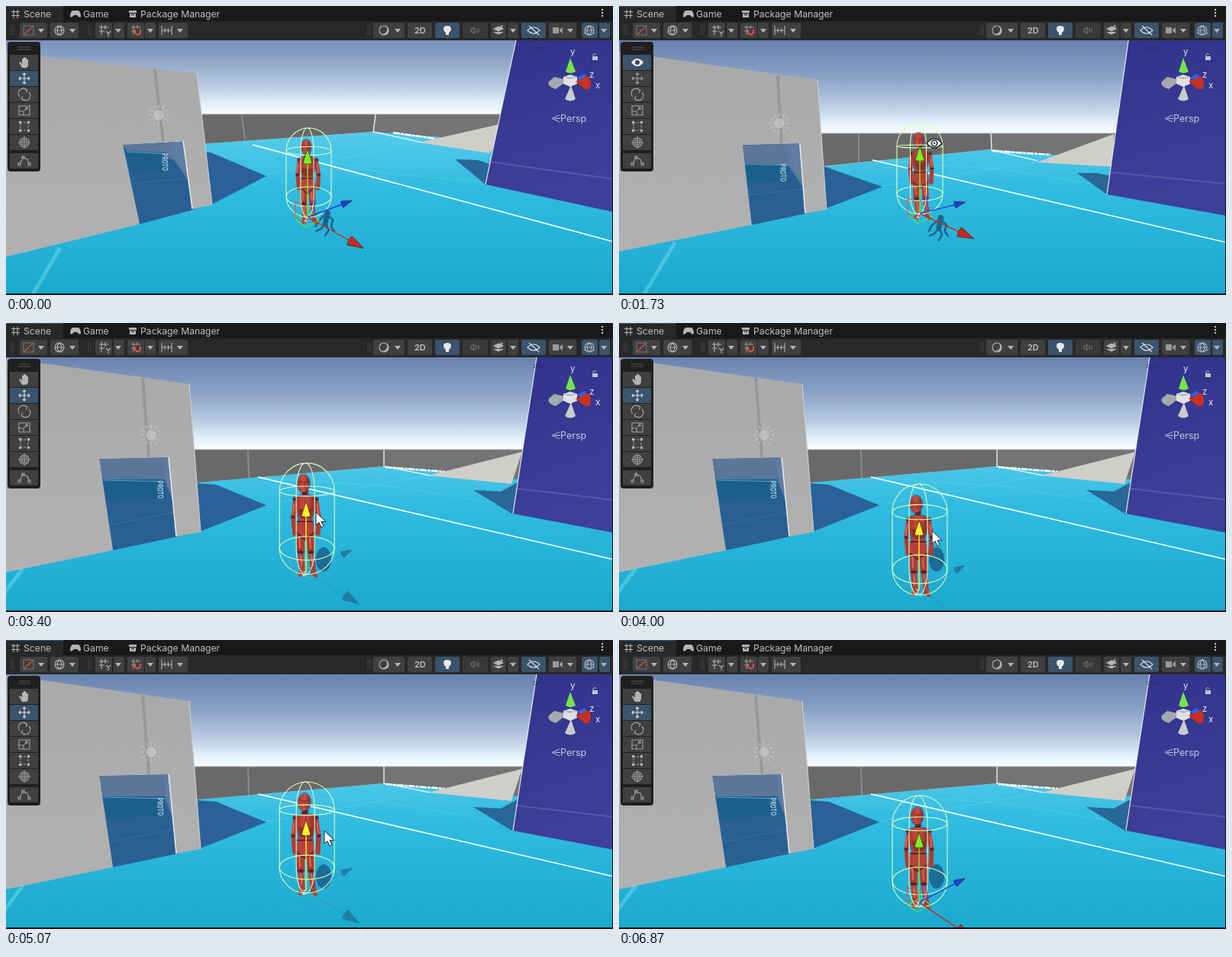
Animation, 795 px wide and 379 px high, one loop 6940 ms. Source, as an HTML page:

```html
<!DOCTYPE html>
<html lang="en">
<head>
<meta charset="utf-8">
<title>Scene view</title>
<style>
html, body { margin: 0; width: 100%; height: 100%; overflow: hidden; background: #191919; }
svg { display: block; width: 795px; height: 379px; }
text { font-family: Inter, Roboto, sans-serif; font-size: 12.2px; fill: #c0c0c0; }
.ico { fill: none; stroke: #b4b4b4; stroke-width: 1.1; }
#tools .ico { stroke: #a2a2a2; }
.wire { fill: none; stroke: #d9ffb8; stroke-width: 1.1; }
</style>
</head>
<body>
<svg id="stage" viewBox="0 0 795 379">
  <defs>
    <linearGradient id="sky" gradientUnits="userSpaceOnUse" x1="0" y1="45" x2="0" y2="168">
      <stop offset="0" stop-color="#6782ae"/><stop offset=".4" stop-color="#8ca3c7"/>
      <stop offset=".7" stop-color="#bccde3"/><stop offset=".88" stop-color="#e4f1fa"/><stop offset="1" stop-color="#fcfeff"/>
    </linearGradient>
    <linearGradient id="floor" gradientUnits="userSpaceOnUse" x1="0" y1="165" x2="0" y2="378">
      <stop offset="0" stop-color="#55cceb"/><stop offset=".35" stop-color="#30bbe0"/><stop offset="1" stop-color="#1aa9cf"/>
    </linearGradient>
    <linearGradient id="purple" x1="0" y1="0" x2=".2" y2="1">
      <stop offset="0" stop-color="#31338c"/><stop offset="1" stop-color="#3d3f98"/>
    </linearGradient>
    <linearGradient id="wall" x1="0" y1="0" x2="0" y2="1">
      <stop offset="0" stop-color="#a9a9aa"/><stop offset="1" stop-color="#b1b1b1"/>
    </linearGradient>
    <linearGradient id="skin">
      <stop offset="0" stop-color="#a8342f"/><stop offset=".5" stop-color="#cc4f3f"/><stop offset="1" stop-color="#8a2a2c"/>
    </linearGradient>
    <clipPath id="view"><rect y="45" width="794" height="332"/></clipPath>
  </defs>

  <rect width="795" height="379" fill="#191919"/>
  <g clip-path="url(#view)">
    <rect id="air" y="45" width="795" height="210" fill="url(#sky)"/>
    <g id="world"></g>
    <text id="sign" style="font:bold 8px Inter,sans-serif;fill:#a9cbe0">PROTO</text>
    <g id="sun" stroke="#cfcfc8" stroke-width="1.2" fill="#cbcbc4" opacity=".65"></g>

    <g id="shade" fill="none" stroke="#1c557f" stroke-width="4" stroke-linecap="round" stroke-linejoin="round">
      <circle cx="2" cy="-14" r="3" fill="#1c557f"/>
      <path stroke-width="8" d="M1-9L-1 2"/>
      <path stroke-width="3" d="M-4-10L-12-2L-16 6M5-9L11-4L8 6L13 13M-2 3L-8 10L-15 13M1 3L4 12L-1 20"/>
    </g>
    <ellipse id="blob" cx="416" cy="310" rx="10" ry="16" fill="#1c5f8c"/>

    <g id="man">
      <g fill="none" stroke="#3f5f88" stroke-width="3" opacity=".75"><use href="#body"/></g>
      <g id="body">
        <g fill="none" stroke="#b03b34" stroke-linecap="round" stroke-linejoin="round">
          <path stroke-width="6" d="M-12 34L-15 57L-13 79M15 34L19 57L18 79"/>
          <path stroke-width="10" d="M-6 80L-5 102M8 80L9 102"/>
          <path stroke-width="7" d="M-5 106L-3 130M9 106L12 131"/>
          <path stroke-width="5" d="M-3 131L-6 134M12 132L15 135"/>
          <path stroke="#db6a55" stroke-width="2" d="M-7 82L-6 98M7 83L8 98M-5 108L-4 122M9 108L11 122M-14 40L-16 54M17 40L19 54"/>
        </g>
        <path d="M-3 20H4V32H-3Z" fill="#542630"/>
        <g id="chest">
          <path d="M-11 30Q1 25 13 30L14 44L9 62H-7L-11 44Z" fill="url(#skin)"/>
          <path d="M-8 45Q1 50 11 45L9 57L1 61L-6 57Z" fill="#8c2d2d"/>
          <path d="M1 30V46" stroke="#7d2929"/>
        </g>
        <path d="M-9 63Q1 60 11 63L14 79L4 87H-1L-12 78Z" fill="#b8413a"/>
        <path d="M-10 63H11M-11 78L0 87L13 78" stroke="#482433" stroke-width="1.7" fill="none"/>
        <g fill="#482433">
          <circle cx="-13" cy="33" r="2"/><circle cx="16" cy="33" r="2"/>
          <circle cx="-15" cy="57" r="2.2"/><circle cx="19" cy="57" r="2.2"/>
          <ellipse cx="-5" cy="104" rx="4" ry="2"/><ellipse cx="9" cy="104" rx="4" ry="2"/>
        </g>
        <g id="head">
          <ellipse cx="-1" cy="12" rx="8" ry="11.5" fill="url(#skin)"/>
          <path d="M-7 9Q0 13 6 8M0 11V19" fill="none" stroke="#7a2529"/>
        </g>
      </g>
    </g>

    <g id="cage" class="wire"></g>
    <g id="handles"></g>
    <g id="arrow"><path d="M0 0V17L4 13.5L7 20L10 18.5L7 12.5H13Z" fill="#fff" stroke="#222"/></g>
    <g id="eye"><path d="M-10 0Q0-12 10 0Q0 12-10 0Z" fill="#fff" stroke="#222" stroke-width="1.5"/><circle r="3.7" fill="none" stroke="#222" stroke-width="1.6"/><circle r="1.2" fill="#222"/></g>
    <g id="compass"></g>
  </g>
  <g id="bars"></g>
  <g id="tools"></g>
</svg>

<script>
const LOOP = 6940, STEP = LOOP / 104;
const $ = id => document.getElementById(id);
const NS = 'http://www.w3.org/2000/svg';

function add(parent, tag, attrs, text) {
  const el = document.createElementNS(NS, tag);
  for (const k in attrs) el.setAttribute(k, attrs[k]);
  if (text) el.textContent = text;
  parent.appendChild(el);
  return el;
}
const set = (el, attrs) => { for (const k in attrs) el.setAttribute(k, attrs[k]); };
const lerp = (a, b, u) => a + (b - a) * u;
const NUM = /-?\d+(\.\d+)?/g;

// Value list at time t from rows of [time, ...values].
function track(t, rows, smooth) {
  let i = 0;
  while (i < rows.length - 2 && t >= rows[i + 1][0]) i++;
  const [a, b] = [rows[i], rows[i + 1]];
  let u = Math.min(1, Math.max(0, (t - a[0]) / (b[0] - a[0])));
  if (smooth) u = u * u * (3 - 2 * u);
  return a.slice(1).map((v, k) => lerp(v, b[k + 1], u));
}

// Blend three camera views; c runs from 0 to 2.
function blend(views, c) {
  const i = Math.min(1, Math.floor(c)), u = c - i;
  if (typeof views[0] === 'number') return lerp(views[i], views[i + 1], u);
  const to = views[i + 1].match(NUM);
  let k = 0;
  return views[i].replace(NUM, n => lerp(+n, +to[k++], u).toFixed(2));
}

// Scenery: attributes, then the same path seen from each camera.
const fill = (f, o = 1) => ({ fill: f, 'fill-opacity': o });
const line = (s, w, o = 1) => ({ fill: 'none', stroke: s, 'stroke-width': w, 'stroke-opacity': o });
const scenery = [
  [fill('url(#floor)'), 'M0 179L250 181L485 165L795 190L795 379L0 379Z', 'M0 209L262 211L487 188L795 210L795 379L0 379Z', 'M0 207L250 209L495 188L795 208L795 379L0 379Z'],
  [fill('#696969'), 'M240 142L484 142L482 165L240 182Z', 'M250 167L487 167L487 188L250 212Z', 'M230 166L495 166L495 188L230 211Z'],
  [fill('#747474'), 'M484 142L680 142L680 181L482 165Z', 'M487 167L680 167L680 205L487 188Z', 'M495 166L700 166L700 208L495 188Z'],
  [line('#8b8b8b', 2), 'M309 144L313 177', 'M314 168L314 204', 'M317 166L318 203'],
  [line('#a5a5a5', 1), 'M249 142L484 142L670 142', 'M260 167L487 167L665 167', 'M240 166L495 166L676 166'],
  [line('#e8f8fc', 1.3), 'M484 142L481 165L545 179', 'M487 167L488 189L548 203', 'M495 166L495 188L556 200'],
  [{ ...line('#f4ffff', 2.5), 'stroke-dasharray': '9 1 4 1' }, 'M507 166L562 174', 'M489 190L565 195', 'M497 189L575 195'],
  [fill('#d0cec8'), 'M541 179L664 151L633 193Z', 'M547 205L648 168L647 211Z', 'M553 200L676 169L662 211Z'],
  [line('#7ddcf0', 1, .3), 'M323 182L500 220L795 245', 'M332 202L510 215L795 262', 'M330 202L510 215L795 262'],
  [line('#7ddcf0', 1, .3), 'M341 221L541 179', 'M345 236L547 205', 'M341 238L553 200'],
  [line('#f6ffff', 1.6), 'M323 182L795 309', 'M332 202L795 310', 'M330 202L795 310'],
  [fill('#286797'), 'M588 201L618 202L635 208L629 235Z', 'M600 219L625 219L645 223L640 248Z', 'M612 219L648 221L670 209L664 251Z'],
  [fill('url(#purple)'), 'M668 45L628 234L795 270L795 45Z', 'M667 45L639 247L795 275L795 45Z', 'M695 45L664 250L795 275L795 45Z'],
  [line('#686bb0', 2, .6), 'M632 204L795 227', 'M644 218L795 233', 'M668 217L795 232'],
  [line('#e5e7f2', 1.2), 'M668 45L628 234', 'M667 45L639 247', 'M695 45L664 250'],
  [fill('#2a6297'), 'M245 191L268 192L341 223L268 261Z', 'M250 211L270 211L345 237L270 266Z', 'M235 209L275 212L341 239L250 275Z'],
  [fill('#2a5f93'), 'M153 182L240 177L246 267L175 286Z', 'M162 182L240 180L246 272L174 287Z', 'M122 178L215 176L225 280L140 298Z'],
  [fill('#5b7698'), 'M153 182L240 177L244 206L159 190Z', 'M162 182L240 180L242 210L164 206Z', 'M122 178L215 176L217 205L127 205Z'],
  [fill('#1d5f8b'), 'M157 190L210 192L214 217L164 220Z', 'M165 206L221 208L222 230L168 232Z', 'M128 205L208 207L209 230L133 235Z'],
  [line('#5d9fc2', 1.2), 'M157 191L214 194', 'M165 207L222 209', 'M128 206L208 208'],
  [fill('#5f7ca2'), 'M211 179L240 177L244 236L217 197Z', 'M221 181L240 180L246 244L223 210Z', 'M206 176L215 176L221 240L209 208Z'],
  [line('#4c7da8', 1, .6), 'M214 194L245 236M165 233L245 225', 'M222 209L245 244M168 248L245 240', 'M208 208L222 240M136 265L220 248'],
  [fill('url(#wall)'), 'M0 61L250 88L270 261L244 266L232 177L153 182L175 286L0 329Z', 'M0 60L260 97L272 267L244 272L237 180L162 182L174 287L0 322Z', 'M0 46L240 80L255 274L223 280L213 176L122 178L140 298L0 327Z'],
  [line('#909092', 4, .7), 'M195 83L206 178', 'M208 91L213 181', 'M179 72L187 176'],
  [line('#ececec', 1.5), 'M232 177L244 266', 'M237 180L244 272', 'M213 176L223 280'],
  [line('#cfd2d6', 1), 'M250 88L270 261', 'M260 97L272 267', 'M240 80L255 274'],
  [line('#8feaf0', 5, .35), 'M35 378L71 317', 'M33 378L74 310', 'M-20 378L22 322'],
].map(([attrs, ...views]) => ({ el: add($('world'), 'path', attrs), views }));

// Sun icon
add($('sun'), 'circle', { r: 6 });
for (let i = 0; i < 12; i++)
  add($('sun'), 'path', { d: 'M0-9V-14', transform: `rotate(${i * 30})` });

// Collider and move handles
const cage = add($('cage'), 'path', {}), rings = add($('cage'), 'path', {});
const H = $('handles');
const planes = add(H, 'g', { fill: 'none', 'stroke-width': 1.1 });
add(planes, 'path', { d: 'M-15 3L-3 13L15 4L4-6Z', stroke: '#58f043' });
add(planes, 'path', { d: 'M-16-20L-2-14V8L-16 0Z', stroke: '#f24a3c' });
add(planes, 'path', { d: 'M0 0L9-4V-22L0-16Z', stroke: '#4b5cff' });
const axes = ['#c92a20', '#2440e0', '#7cf01e'].map(color => ({
  color,
  rod: add(H, 'path', { 'stroke-width': 1.4 }),
  tip: add(H, 'path', { 'stroke-width': .6 }),
}));
const core = add(H, 'path', { d: 'M-2-2H2L-2 3H2', fill: 'none', stroke: '#fff', 'stroke-width': 1 });

function drawAxis(axis, x0, y0, x, y, size, color, ghost) {
  const a = Math.atan2(y - y0, x - x0) * 180 / Math.PI;
  set(axis.rod, { d: `M${x0} ${y0}L${x} ${y}`, stroke: color, opacity: ghost ? .16 : 1 });
  set(axis.tip, {
    d: `M${size} 0L${-size * .75} ${-size * .55}Q${-size} 0 ${-size * .75} ${size * .55}Z`,
    transform: `translate(${x} ${y}) rotate(${a})`,
    fill: ghost ? '#1d6f96' : color, stroke: ghost ? '#2a5878' : '#222', opacity: ghost ? .75 : 1,
  });
}

// View compass
const C = $('compass');
[['M718 93L736 97L720 109Q708 105 711 99Z', '#a5a8ad'], ['M746 95L757 89Q763 93 758 98Z', '#2c63e6'],
 ['M733 86Q739 90 746 86L739 68Z', '#79e34b'], ['M732 122Q739 127 746 122L740 104Z', '#c9cbce'],
 ['M730 93L739 90L748 93V102L739 106L730 102Z', '#dfe1e4'], ['M730 93L739 96L748 93M739 96V106', '#b5b7ba'],
 ['M746 99L762 92Q769 98 764 109L758 109Z', '#c9301f']
].forEach(([d, f]) => add(C, 'path', { d, fill: f }));
[['y', 739, 64], ['z', 764, 94], ['x', 772, 108]].forEach(([s, x, y]) =>
  add(C, 'text', { x, y, style: 'font-size:11.5px;fill:#e6e6ee' }, s));
add(C, 'rect', { x: 768, y: 66, width: 7, height: 5, fill: '#c4c4d4' });
add(C, 'path', { d: 'M769 66V64Q771 61 773 64', class: 'ico' });
add(C, 'path', { d: 'M725 143L715 147.500L725 152M718 147.500H726', class: 'ico', style: 'stroke:#c0c0dc;stroke-width:1' });
add(C, 'text', { x: 726, y: 152, style: 'font-size:12.5px;fill:#c6c6de' }, 'Persp');
add(C, 'path', { d: 'M690 55H706M690 58H706', stroke: '#23263f', opacity: .5 });

// Tabs and top toolbar
const B = $('bars');
const BUTTON = '#404040', ACTIVE = '#3b536c', OFF = '#383838';
const box = (x, w, color = BUTTON) => add(B, 'rect', { x, y: 22, width: w, height: 20, rx: 2, fill: color });
const icon = (d, extra = {}) => add(B, 'path', { d, class: 'ico', ...extra });
const solid = { style: 'fill:#b4b4b4;stroke:none' };
const caret = x => icon(`M${x - 4} 30H${x + 4}L${x} 35Z`, solid);
const globe = (x, y) => icon(`M${x - 6} ${y}a6 6 0 1 0 12 0a6 6 0 1 0-12 0M${x - 6} ${y}H${x + 6}M${x} ${y - 6}q-6 6 0 12q6-6 0-12`);
add(B, 'rect', { width: 795, height: 45, fill: '#282828' });
add(B, 'rect', { width: 795, height: 20, fill: '#191919' });
add(B, 'rect', { width: 75, height: 20, fill: '#282828' });
add(B, 'rect', { width: 75, height: 1, fill: '#2f5878' });
icon('M7 7.500H18M7 12.500H18M10 5V16M15 5V16');
icon('M87 6H95Q98 8 98 14Q96 16 93 12H89Q86 16 84 14Q84 8 87 6Z', solid);
icon('M161 6H171V9H161ZM162 10H170V15H162Z', solid);
icon('M164 11.500H168', { style: 'stroke:#222' });
[['Scene', 23], ['Game', 101], ['Package Manager', 176]].forEach(([s, x]) => add(B, 'text', { x, y: 15 }, s));
[5, 9, 13].forEach(cy => add(B, 'circle', { cx: 781, cy, r: 1.2, fill: '#c8c8c8' }));
[7, 108, 474].forEach(x => icon(`M${x} 25V39M${x + 3} 25V39`, { style: 'stroke:#444' }));
[[18, 36], [58, 37], [117, 22], [141, 14], [159, 22], [182, 14], [200, 38], [481, 41], [526, 32], [562, 32, ACTIVE],
 [598, 33, OFF], [635, 20], [657, 14], [675, 32, ACTIVE], [711, 36], [754, 21, ACTIVE], [777, 14, ACTIVE]].forEach(b => box(...b));
[46, 87, 147, 189, 228, 513, 664, 739, 783].forEach(caret);
icon('M23 26H36V38H23Z', { style: 'stroke:#777' });
icon('M24 37L35 27', { style: 'stroke:#e25345' });
globe(70, 32);
icon('M122 28H134M122 33H129M125 25V38M130 25V31M131 33L134 36L137 33M134 36V40');
icon('M164 28H176M164 33H168M167 25V38M172 25V29', { style: 'stroke:#999' });
icon('M169 31V35Q172.500 40 176 35V31', { style: 'stroke:#e25345;stroke-width:2' });
icon('M204 26V38M217 26V38M204 32H217M208 29V35M212.500 29V35');
icon('M489 32a6 6 0 1 0 12 0a6 6 0 1 0-12 0');
icon('M498 27Q502 35 492 37Q503 39 501 30Z', solid);
add(B, 'text', { x: 535, y: 36, style: 'font-size:11px;font-weight:600' }, '2D');
icon('M578 26Q583 26 583 30Q583 33 580 35V38H576V35Q573 33 573 30Q573 26 578 26Z', { style: 'fill:#e8e8e8;stroke:none' });
icon('M609 30H611L613 28V36L611 34H609ZM616 29V35M619 29V35', { style: 'stroke:#757575' });
icon('M639 30L645 27L651 30L645 33ZM639 34L645 37L651 34M649 25V29M647 27H651', { style: 'fill:#b4b4b4' });
icon('M683 32Q691 24 699 32Q691 40 683 32ZM685 26L698 38', { style: 'stroke:#e0e0e0' });
icon('M716 28H724V36H716ZM725 31L729 28V36L725 33Z', { style: 'fill:#999;stroke:none' });
globe(764, 32);
icon('M764 25V27M757 36L759 35M771 36L769 35');
icon('M0 377.500H795M794.500 45V379', { style: 'stroke:#151515' });

// Side tools
const T = $('tools');
add(T, 'rect', { x: 2, y: 47, width: 43, height: 170, rx: 4, fill: '#1f1f1f' });
add(T, 'path', { d: 'M16 54H32M16 57H32', stroke: '#555' });
const slots = [74, 95, 116, 137, 158, 179, 203].map(y =>
  add(T, 'rect', { x: 5, y: y - 10, width: 37, height: 20, rx: 1, fill: BUTTON }));
const glyph = (y, d, extra = {}) => add(T, 'path', { d, class: 'ico', transform: `translate(24 ${y})`, ...extra });
const hand = glyph(74, 'M-3 7L-7 0L-5-1L-3 2V-5H-1V-1V-7H1V-1V-6H3V0V-4H5V4L3 7Z', solid);
const look = glyph(74, 'M-8 0Q0-10 8 0Q0 10-8 0Z', { style: 'fill:#eee;stroke:none' });
const pupil = glyph(74, 'M-3 0a3 3 0 1 0 6 0a3 3 0 1 0-6 0', { style: 'fill:#34495f;stroke:none' });
const move = glyph(95, 'M-7 0H7M0-7V7M-5-2L-7 0L-5 2M5-2L7 0L5 2M-2-5L0-7L2-5M-2 5L0 7L2 5');
glyph(116, 'M-6 3A6 6 0 0 1 3-6M6-3A6 6 0 0 1-3 6M0-7L4-6L2-2M0 7L-4 6L-2 2');
glyph(137, 'M-7-6H7V6H-7ZM-7 1H-1V6M0 0L4-4M1-4H4V-1');
glyph(158, 'M-5-5H5V5H-5Z', { style: 'stroke-dasharray:3 1.5' });
glyph(158, 'M-7-7h3v3h-3zM4-7h3v3h-3zM-7 4h3v3h-3zM4 4h3v3h-3z', solid);
glyph(179, 'M-6 0a6 6 0 1 0 12 0a6 6 0 1 0-12 0M-8 0H8M0-8V8M-3-3H3V3H-3Z');
glyph(203, 'M-6 4L-2-4L4-2L6 4M-8 3h3v3h-3zM-3-6h3v3h-3zM5 3h3v3h-3z');

const CAMERA = [[0, 0], [1530, 0], [1730, 1], [2470, 2], [LOOP, 2]];
const DROP = [[0, 0], [3130, 0], [3600, 67], [4000, 69], [4370, 41], [4720, 67], [5070, 44], [5160, 41], [5500, 66], [5800, 62], [LOOP, 62]];
const POINTER = [[400, 607, 280], [730, 614, 262], [1000, 641, 235], [1470, 408, 182]];
const GAZE = [[1500, 413, 180], [1730, 413, 180], [2250, 505, 184], [2600, 515, 184], [2900, 515, 184]];

function draw(t) {
  const c = track(t, CAMERA)[0], d = track(t, DROP, true)[0];
  const view = (...v) => blend(v, c);
  const looking = t >= 1500 && t < 2900, dragging = t >= 3070 && t < 5870;

  scenery.forEach(p => p.el.setAttribute('d', blend(p.views, c)));
  set($('air'), { transform: `translate(0 ${view(-25, 0, -1)})` });
  set($('sun'), { transform: `translate(${view(200, 210, 190)} ${view(143, 154, 147)})` });
  set($('sign'), { transform: `translate(${view(204, 211, 198)} ${view(193, 207, 207)}) rotate(88) scale(.85 1.3)` });

  // Mannequin with a slow idle sway
  const sway = Math.sin(t / 2200 * 2 * Math.PI), far = d / 62;
  set($('man'), { transform: `translate(${view(394, 394, 391)} ${view(175, 166, 157) + d}) scale(${view(.81, .83, 1) - far * .03})` });
  set($('head'), { transform: `translate(${sway * .6} 0) rotate(${sway * 2} 0 22)` });
  set($('chest'), { transform: `translate(${sway * .4} ${sway * .3})` });
  set($('shade'), { transform: `translate(${view(419, 420, 424) + sway * .4} ${view(284, 290, 302) + d * .2}) scale(${view(.85, .85, .95)})`, opacity: Math.max(0, .85 - d / 40) });
  set($('blob'), { opacity: Math.min(.85, d / 45) });

  // Capsule
  const x = view(396.5, 394, 394.5) - far * .5, w = view(29.5, 30, 36), n = view(8.5, 10.5, 12);
  const top = view(160, 154, 142) + d, up = view(190, 184, 179) + d, low = view(250, 246, 254) + d, end = view(277, 273, 288) + d;
  const horizon = view(142, 167, 166);
  const pill = (cx, r) => `M${cx - r} ${low}V${up}A${r} ${up - top} 0 0 1 ${cx + r} ${up}V${low}A${r} ${end - low} 0 0 1 ${cx - r} ${low}Z`;
  const ring = y => { const r = Math.max(1, (y - horizon) * .12); return `M${x - w} ${y}a${w} ${r} 0 1 0 ${2 * w} 0a${w} ${r} 0 1 0 ${-2 * w} 0`; };
  set(cage, { d: pill(x, w) + pill(x - 2, n) });
  set(rings, { d: ring(up) + ring(low) });

  // Handles
  const gx = view(395, 394, 393), gy = view(277, 272, 290) + d * .87, tipY = view(198, 194, 208) + d * .89;
  drawAxis(axes[0], gx, gy, view(458, 454, 452), view(312, 300, 318) + d * 1.06, 12, axes[0].color, dragging);
  drawAxis(axes[1], gx, gy, 446, view(258, 259, 270) + d * .75, 8, axes[1].color, dragging);
  drawAxis(axes[2], gx, gy, gx, tipY, 11, dragging ? '#fff12a' : axes[2].color, false);
  planes.setAttribute('transform', `translate(${gx} ${gy})`);
  planes.setAttribute('opacity', dragging ? .2 : .9);
  core.setAttribute('transform', `translate(${gx - 2} ${gy + 2})`);

  // Pointers
  let p = null;
  if (t >= 400 && t < 1500) p = track(t, POINTER, true);
  else if (t >= 2900 && t < 3130) p = track(t, [[2900, 450, 190], [3130, 404, 218]], true);
  else if (dragging) p = [track(t, [[3130, 404], [4000, 410], [5070, 417], [5870, 414]])[0], tipY + 3];
  set($('arrow'), { visibility: p ? 'visible' : 'hidden', transform: p ? `translate(${p})` : '' });
  set($('eye'), { visibility: looking ? 'visible' : 'hidden', transform: `translate(${track(t, GAZE, true)})` });

  slots[0].setAttribute('fill', looking ? ACTIVE : BUTTON);
  slots[1].setAttribute('fill', looking ? BUTTON : ACTIVE);
  move.style.stroke = looking ? '' : '#dcdcdc';
  set(hand, { visibility: looking ? 'hidden' : 'visible' });
  [look, pupil].forEach(el => set(el, { visibility: looking ? 'visible' : 'hidden' }));
}

// Steps begin on a 10 ms grid, so allow for that rounding.
const start = performance.now();
function tick() {
  const t = (performance.now() - start) % LOOP;
  draw(Math.floor((t + 8) / STEP) * STEP);
  requestAnimationFrame(tick);
}
tick();
</script>
</body>
</html>
```
